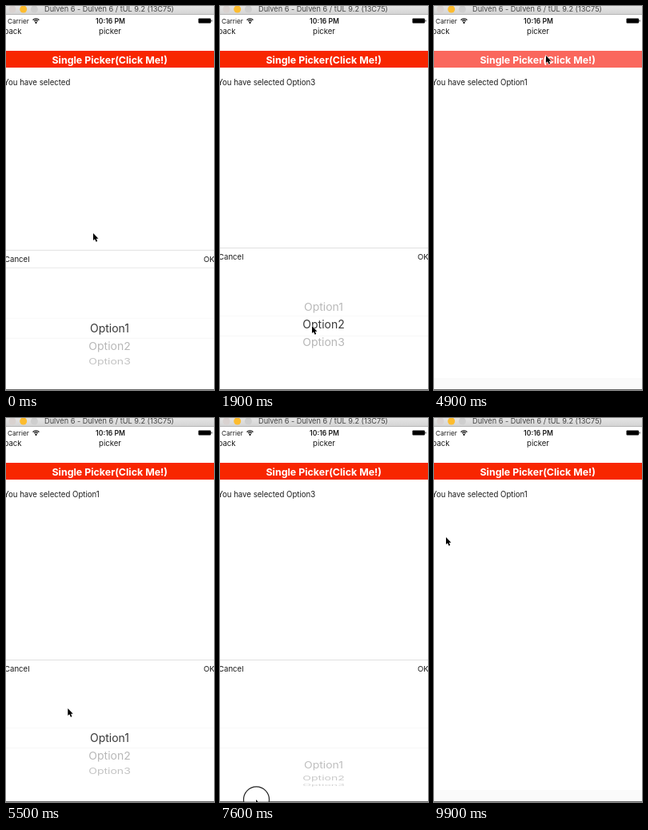
An HTML page with a canvas for the animation above (10 s loop, 260 by 480 pixels).

```html
<!DOCTYPE html>
<html lang="en">
<head>
<meta charset="utf-8">
<title>Picker demo</title>
<style>
  html, body { margin: 0; width: 100%; height: 100%; overflow: hidden; background: #fff; }
  canvas { display: block; }
</style>
</head>
<body>
<canvas id="stage" width="260" height="480"></canvas>
<script>
const ctx = document.getElementById('stage').getContext('2d');
const LOOP = 10000, STEP = 100;
const ROW = 22, ROW_ANGLE = 0.371, RADIUS = 60.7, CENTER = 400.4;
const PANEL_TOP = 302, PANEL_HEIGHT = 178;
const SETTLE = 300, SLIDE = 400, TRAVEL = 500;

// Everything follows from the pointer: taps toggle the panel, drags turn the wheel.
const tap = (start, x, y, hold = 200) => ({ start, end: start + hold, x, from: y, to: y, isTap: true });
const drag = (start, end, x, from, to) => ({ start, end, x, from, to });
const gestures = [
  tap(-500, 109, 284),
  drag(500, 1000, 118, 420, 376),
  drag(1500, 1900, 115, 380, 400),
  drag(2300, 2700, 116, 398, 420),
  tap(3500, 251, 314),
  tap(4800, 140, 62),
  drag(5600, 6000, 70, 398, 376),
  drag(6500, 6900, 70, 376, 354),
  drag(7200, 7700, 45, 399, 486),
  tap(8300, 251, 313, 100),
  tap(9900, 15, 149)
];
const taps = gestures.filter(g => g.isTap);
const drags = gestures.filter(g => !g.isTap);

const clamp = (v, lo, hi) => Math.min(hi, Math.max(lo, v));
const mix = (a, b, p) => a + (b - a) * p;
function ease(t, start, duration) {
  const p = clamp((t - start) / duration, 0, 1);
  return p * p * (3 - 2 * p);
}
const handY = (g, t) => mix(g.from, g.to, ease(t, g.start, g.end - g.start));

function pointerAt(t) {
  const i = gestures.findLastIndex(g => g.start <= t);
  const g = gestures[i], next = gestures[i + 1];
  const down = t < g.end;
  let x = g.x, y = handY(g, t);
  if (!down && next) {
    const begin = Math.max(g.end, next.start - TRAVEL);
    const p = ease(t, begin, next.start - begin);
    x = mix(x, next.x, p);
    y = mix(y, next.from, p);
  }
  return { x, y, down };
}

function wheelAt(t) {
  let pos = 0, label = '';
  for (const g of drags) {
    if (t < g.start) break;
    const raw = pos - (handY(g, t) - g.from) / ROW;
    const row = clamp(Math.round(raw), 0, 2);
    pos = mix(raw, row, ease(t, g.end, SETTLE));
    if (t >= g.end + SETTLE) label = 'Option' + (row + 1);
  }
  return { pos, label };
}

function panelOffset(t) {
  const done = taps.filter(g => g.end <= t);
  const p = clamp((t - done.at(-1).end) / SLIDE, 0, 1);
  const rest = (1 - p) ** 3;
  return PANEL_HEIGHT * (done.length % 2 ? rest : 1 - rest);
}

function rect(x, y, w, h, color) {
  ctx.fillStyle = color;
  ctx.fillRect(x, y, w, h);
}

function disc(x, y, r, color) {
  ctx.fillStyle = color;
  ctx.beginPath();
  ctx.arc(x, y, r, 0, 7);
  ctx.fill();
}

function text(str, x, y, size, { color = '#1a1a1a', align = 'left', weight = 400 } = {}) {
  ctx.font = `${weight} ${size}px Inter, sans-serif`;
  ctx.textAlign = align;
  ctx.fillStyle = color;
  ctx.fillText(str, x, y + size * 0.36);
}

function drawWindow() {
  const bar = ctx.createLinearGradient(0, 0, 0, 11);
  bar.addColorStop(0, '#e4e4e4');
  bar.addColorStop(1, '#d3d3d3');
  rect(0, 0, 260, 11, bar);
  rect(0, 10, 260, 1, '#b5b5b5');
  ['#d9d2d0', '#fdbc2e', '#cecece'].forEach((c, i) => disc(8 + 13.7 * i, 4, 4.5, c));
  text('Dulven 6 - Dulven 6 / tUL 9.2 (13C75)', 129, 4, 9.2, { color: '#444', align: 'center' });
}

function drawStatus() {
  text('Carrier', 2, 19, 8.2);
  ctx.strokeStyle = '#111';
  ctx.lineWidth = 1.3;
  for (const r of [3.4, 5.6]) {
    ctx.beginPath();
    ctx.arc(37.5, 21.5, r, -Math.PI * 0.75, -Math.PI * 0.25);
    ctx.stroke();
  }
  disc(37.5, 20.8, 1.2, '#111');
  text('10:16 PM', 130.5, 19, 8.6, { align: 'center', weight: 600 });
  ctx.fillStyle = '#000';
  ctx.beginPath();
  ctx.roundRect(240.5, 15.5, 15.5, 6, 1);
  ctx.fill();
  rect(256.5, 17.5, 1, 2, '#000');
  text('back', -2.5, 31.5, 9.6);
  text('picker', 130, 31.5, 9.6, { align: 'center' });
}

function drawPage(label, pointer) {
  const pressed = pointer.down && pointer.y > 56 && pointer.y < 77;
  rect(0, 56, 260, 21, pressed ? '#fa675d' : '#f82600');
  text('Single Picker(Click Me!)', 129.7, 67.5, 12.4, { color: '#fff', align: 'center', weight: 700 });
  text('You have selected ' + label, -2.8, 95.5, 9.65);
  rect(0, 465, 260, 15, '#fafafa');
}

function drawWheel(pos) {
  rect(0, 387, 260, 1, '#f9f9f9');
  rect(0, 412, 260, 1, '#f6f6f6');
  for (let i = 0; i < 3; i++) {
    const angle = (i - pos) * ROW_ANGLE;
    if (Math.abs(angle) > 1.45) continue;
    const y = RADIUS * Math.sin(angle);
    const grey = 172 + 30 * Math.abs(angle);
    const color = Math.abs(y) < ROW / 2 ? '#383838' : `rgb(${grey},${grey},${grey})`;
    ctx.save();
    ctx.translate(129.5, CENTER + y);
    ctx.scale(1, Math.cos(angle));
    text('Option' + (i + 1), 0, 0, 14, { color, align: 'center' });
    ctx.restore();
  }
}

function drawPanel(offset, pos) {
  ctx.save();
  ctx.translate(0, offset);
  rect(0, PANEL_TOP, 260, PANEL_HEIGHT, '#fff');
  rect(0, PANEL_TOP, 260, 1, '#e0e0e0');
  if (offset > 0) rect(0, PANEL_TOP + 22, 260, 1, '#e8e8e8');
  text('Cancel', -2, 313.5, 9.6);
  text('OK', 247, 313.5, 9.6);
  drawWheel(pos);
  ctx.restore();
}

function drawPointer({ x, y, down }) {
  if (down && y > PANEL_TOP) {
    disc(x + 0.5, Math.min(y, 477), 16, 'rgba(255,255,255,0.4)');
    ctx.strokeStyle = '#222';
    ctx.lineWidth = 1.2;
    ctx.stroke();
  }
  ctx.save();
  ctx.translate(x, y);
  ctx.scale(0.9, 0.9);
  const arrow = new Path2D('M0 0V10L2.3 8L4 12L5.8 11.2L4.2 7.4H7.2Z');
  ctx.strokeStyle = '#fff';
  ctx.lineWidth = 1.2;
  ctx.stroke(arrow);
  ctx.fillStyle = '#000';
  ctx.fill(arrow);
  ctx.restore();
}

function draw(now) {
  const t = Math.floor((now % LOOP) / STEP) * STEP;
  const pointer = pointerAt(t);
  const { pos, label } = wheelAt(t);
  const offset = panelOffset(t);
  rect(0, 0, 260, 480, '#fff');
  drawWindow();
  drawStatus();
  drawPage(label, pointer);
  if (offset < PANEL_HEIGHT) drawPanel(offset, pos);
  rect(0, 479, 260, 1, '#666');
  drawPointer(pointer);
}

let start;
function tick(now) {
  start ??= now;
  draw(Math.max(0, now - start));
  requestAnimationFrame(tick);
}
draw(0);
requestAnimationFrame(tick);
</script>
</body>
</html>
```
